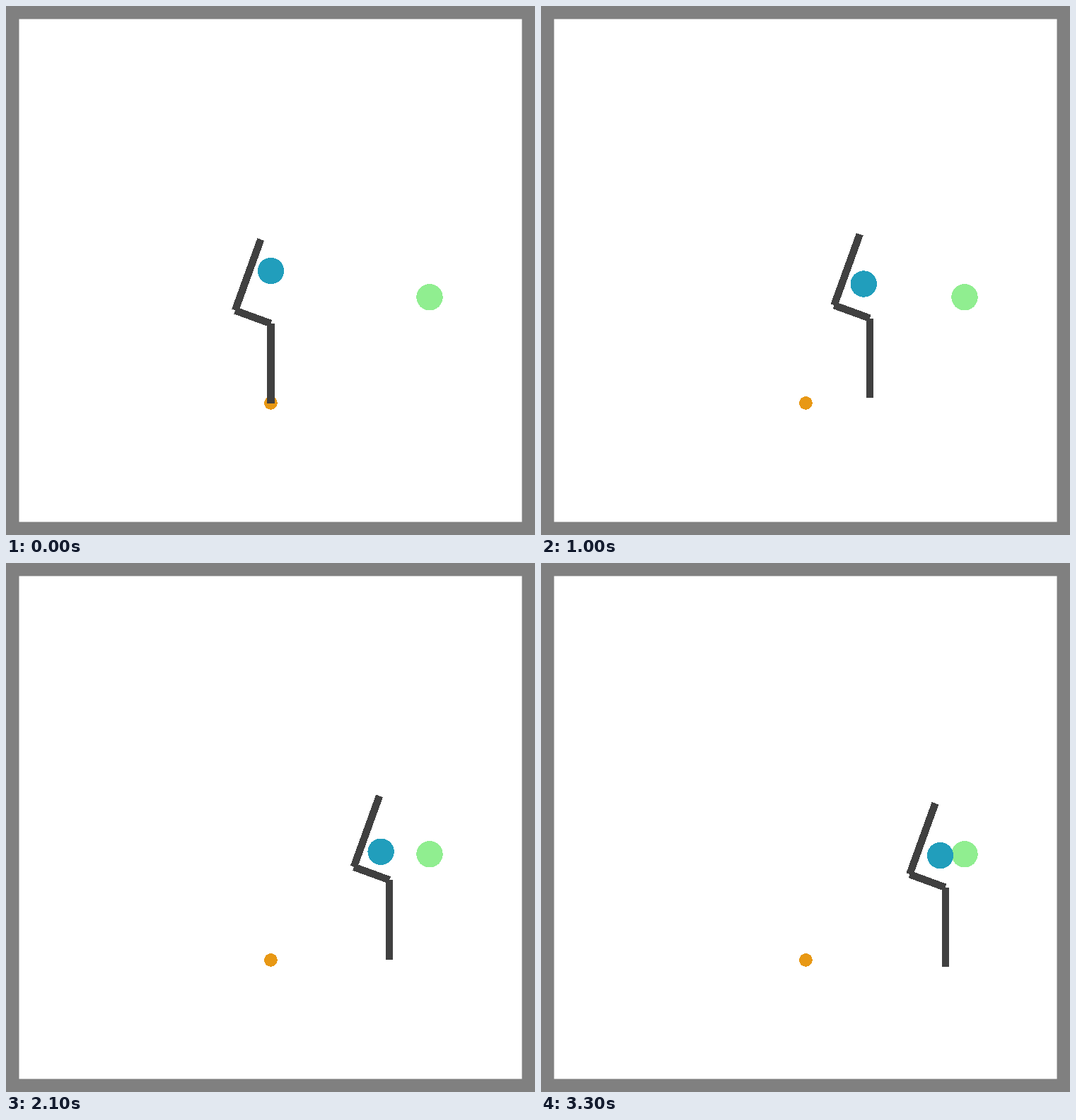
Write an HTML page that moves like this. It is 748x748 px and loops after 3350 ms.

```html
<!DOCTYPE html>
<html>
<head>
<meta charset="utf-8">
<style>
html, body { margin: 0; width: 100%; height: 100%; overflow: hidden; }
svg { display: block; width: 100vw; height: 100vh; }
</style>
</head>
<body>
<svg viewBox="0 0 748 748">
  <rect width="748" height="748" fill="#808080"/>
  <rect x="18.5" y="18.5" width="711" height="711" fill="#fff"/>
  <g shape-rendering="crispEdges">
    <circle cx="374.4" cy="561.4" r="9.4" fill="#e89814"/>
    <circle cx="599" cy="411.8" r="18.7" fill="#90ee90"/>
    <path id="arm" d="M0 0V-112.5M0-112.5L-50.3-130.9M-50.4-131.1L-14.2-231.4" stroke="#404040" stroke-width="10.4"/>
    <circle id="ball" r="18.7" fill="#219ebc"/>
  </g>
</svg>
<script>
const LOOP = 3350, STEP = 50;

// Control points of the Bézier curve each part follows during one loop
const paths = {
  arm: [[374.4, 561.5], [429.6, 543.8], [571.1, 560.5], [549.2, 561.9], [571.7, 571.2]],
  ball: [[374.5, 374.5], [443.6, 388.6], [512.6, 409.8], [565.6, 412.5], [564.5, 413.6]]
};

const mix = (a, b, u) => a.map((v, i) => v + (b[i] - v) * u);

// De Casteljau's algorithm
function bezier(points, u) {
  if (points.length === 1) return points[0];
  return bezier(points.slice(1).map((p, i) => mix(points[i], p, u)), u);
}

function draw() {
  const step = Math.floor(performance.now() % LOOP / STEP);
  const u = step * STEP / (LOOP - STEP);
  for (const id in paths) {
    document.getElementById(id).setAttribute('transform', `translate(${bezier(paths[id], u)})`);
  }
  requestAnimationFrame(draw);
}
draw();
</script>
</body>
</html>
```
